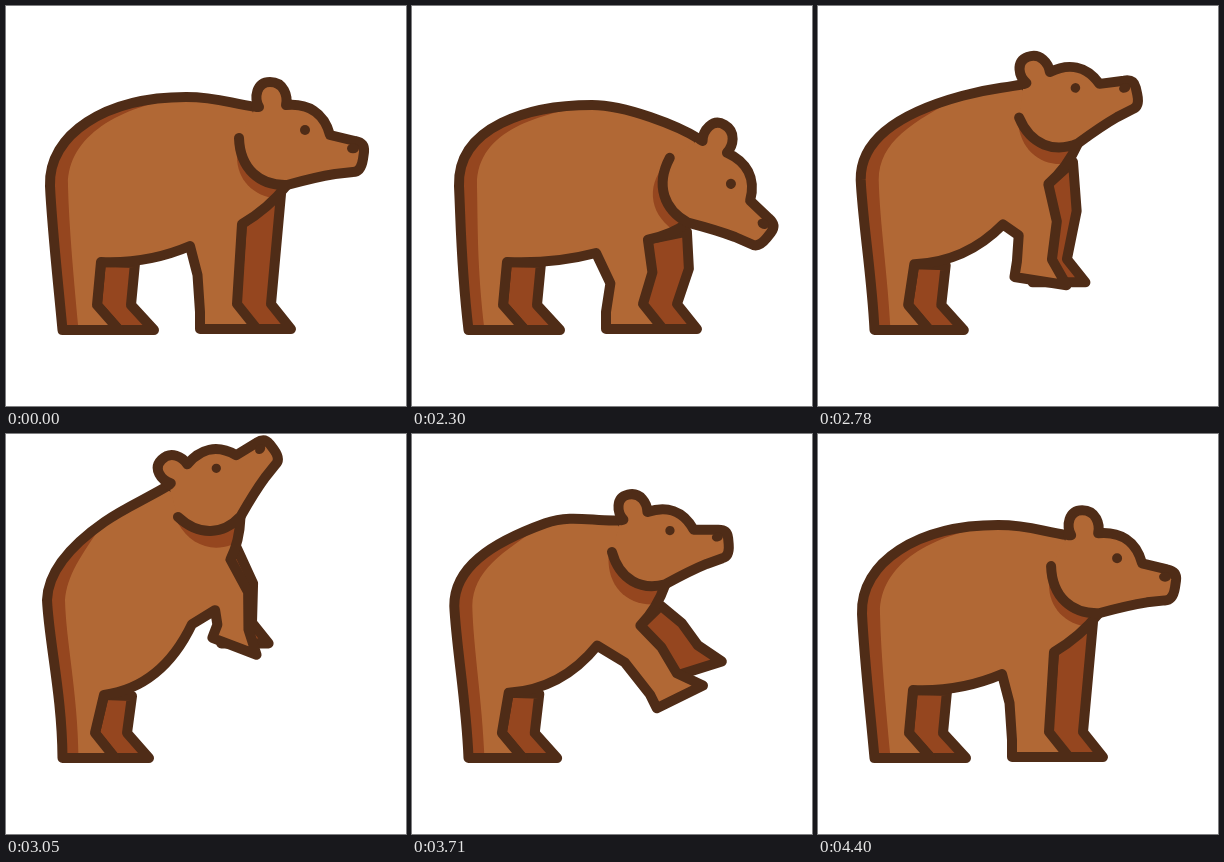
Write an HTML page with a canvas that moves like this. It is 400 px wide and 400 px high and loops after 4430 ms.

```html
<!DOCTYPE html>
<html lang="en">
<head>
<meta charset="utf-8">
<title>Bear</title>
<style>
  html, body { margin: 0; height: 100%; overflow: hidden; background: #fff; }
  canvas { display: block; width: 100vw; height: 100vh; }
</style>
</head>
<body>
<canvas id="stage" width="400" height="400"></canvas>
<script>
const ctx = document.getElementById('stage').getContext('2d');
const FUR = '#b16835', SHADE = '#95461f', LINE = '#4f2c17', WEIGHT = 10;
const LOOP = 4430, EYE = [299, 124];

// Drawn in rest coordinates and turned about the eye.
const HEAD = new Path2D('M250 101H253C248 92 250 76 264 76C278 76 282 90 280 99' +
  'C301 97 318 106 324 129L349 135Q359 137 358 146L357 153Q355 166 347 166L329 168' +
  'Q310 171 281 179C254 180 234 163 233 132');
const THROAT = new Path2D('M233 136C225 165 241 190 272 193L285 180L250 140Z');

// A pose: eye x, y, head angle, head size, rise of the torso, elbow bend,
// then wrist x, y and paw angle for the near and the far foreleg.
const planted = [231, 298, 0, 265, 298, 0];
const stand = [299, 124, 0, 1, 0, 0, ...planted];
const crouch = [319, 178, 30, 1, 0, 7, ...planted];
const push = [305, 141, 9.5, .98, 0, 5, 230, 298, 0, 254, 297, 0];
const rear = [210, 34, -45, .93, 1, 9, 243, 195, 21, 246, 187, 0];
const reach = [229, 57, -35, .89, .85, 4, 257, 204, -35, 272, 168, -35];
const fall = [242, 75, -25, .91, .72, 3, 270, 222, -32, 289, 188, -24];
const keys = [[2000, stand], [2310, crouch], [2540, push], [3070, rear],
  [3500, reach], [3640, fall], [3950, crouch], [4420, stand]];

// Monotone cubic interpolation: poses flow through the keys without overshoot.
function slope(k, i) {
  if (k === 0 || k === keys.length - 1) return 0;
  const rate = n => (keys[n + 1][1][i] - keys[n][1][i]) / (keys[n + 1][0] - keys[n][0]);
  const a = rate(k - 1), b = rate(k);
  return a * b > 0 ? 2 * a * b / (a + b) : 0;
}

function poseAt(time) {
  const k = keys.findIndex(([end]) => time < end) - 1;
  if (k < 0) return stand;
  const [start, from] = keys[k], [end, to] = keys[k + 1];
  const d = end - start, u = (time - start) / d, ease = u * u * (3 - 2 * u);
  return from.map((v, i) => v + (to[i] - v) * ease +
    d * u * (1 - u) * ((1 - u) * slope(k, i) - u * slope(k + 1, i)));
}

const add = ([x, y], dx, dy = 0) => [x + dx, y + dy];
const middle = (a, b) => [(a[0] + b[0]) / 2, (a[1] + b[1]) / 2];
const spin = (x, y, degrees) => {
  const a = degrees * Math.PI / 180, c = Math.cos(a), s = Math.sin(a);
  return [x * c - y * s, x * s + y * c];
};

function polygon(points) {
  const path = new Path2D();
  points.forEach(p => path.lineTo(...p));
  path.closePath();
  return path;
}

function paint(path, fill) {
  ctx.fillStyle = fill;
  ctx.fill(path);
  ctx.stroke(path);
}

function dot(x, y, rx, ry) {
  ctx.beginPath();
  ctx.ellipse(x, y, rx, ry, 0, 0, 7);
  ctx.fillStyle = LINE;
  ctx.fill();
}

// Front edge of a foreleg and its paw, from shoulder round to the back of the wrist
function foreleg(shoulder, wrist, paw, bend, scale) {
  const dx = wrist[0] - shoulder[0], dy = wrist[1] - shoulder[1], reach = Math.hypot(dx, dy);
  const elbow = add(middle(shoulder, wrist), bend * dy / reach, -bend * dx / reach);
  const onPaw = (x, y) => add(wrist, ...spin(x * scale, y * scale, paw));
  return { elbow, toe: onPaw(20, 25), heel: onPaw(-37, 25), ankle: onPaw(-37, 8) };
}

function draw([ex, ey, angle, size, rise, bend, nearX, nearY, nearPaw, farX, farY, farPaw]) {
  const sink = Math.max(0, angle) / 30;
  const onHead = (x, y) => add([ex, ey], ...spin((x - EYE[0]) * size, (y - EYE[1]) * size, angle));
  const inHead = (scale, action) => {
    ctx.save();
    ctx.translate(ex, ey);
    ctx.rotate(angle * Math.PI / 180);
    ctx.scale(scale, scale);
    ctx.translate(-EYE[0], -EYE[1]);
    ctx.lineWidth = WEIGHT / scale;
    action();
    ctx.restore();
  };

  // Back line, from the hind foot over hip and top to the nape
  const foot = [56.5, 324], nape = onHead(250, 101), jaw = onHead(281, 179);
  const hip = [44 - 3 * rise + 3 * sink, 180 - 14 * rise];
  const top = [180 - 82 * rise, 91 - 3 * rise + 8 * sink], tilt = -35 * rise;
  const heelBend = [52 + 4 * rise - 3 * sink, 275 - 15 * rise - 15 * sink];
  const thigh = add(hip, 2, 42);
  const rump = add(hip, -2 + 3 * rise, -52 + 25 * rise - 8 * sink);
  const loin = add(top, ...spin(-80 + 36 * rise + 18 * sink, 0, tilt));
  const withers = add(top, ...spin(33 - 8 * rise, 0, tilt));
  const neck = add(nape, ...spin(-26, 0, angle * .85 + 7));

  // Forelegs hang from the jaw; the hind legs only lean a little.
  const scale = 1 - .17 * rise;
  const nearWrist = [nearX, nearY], farWrist = [farX, farY];
  const shoulder = add(jaw, -45 + 35 * rise + 5 * sink, 39 + 4 * rise - 22 * sink);
  const farShoulder = add(jaw, -6 + 2 * rise + 5 * sink, 9 + 22 * rise);
  const near = foreleg(shoulder, nearWrist, nearPaw, bend, scale);
  const far = foreleg(farShoulder, farWrist, farPaw, bend, scale);
  const armpit = [184 + 2 * rise, 240 - 50 * rise + 7 * sink];
  const groin = [95 + 3 * rise, 256 + 5 * rise];
  const knee = [91 - 2 * rise, 299], toe = [113 - 4 * rise, 324];

  ctx.clearRect(0, 0, 400, 400);
  ctx.strokeStyle = LINE;
  ctx.lineWidth = WEIGHT;
  ctx.lineJoin = ctx.lineCap = 'round';

  paint(polygon([groin, add(groin, 34 - 6 * rise, 1), add(knee, 34 - 2 * rise),
    add(toe, 35 - rise), toe, knee]), SHADE);
  paint(polygon([farShoulder, far.elbow, farWrist, far.toe, far.heel, shoulder]), SHADE);

  const back = path => {
    path.moveTo(...foot);
    path.bezierCurveTo(...heelBend, ...thigh, ...hip);
    path.bezierCurveTo(...rump, ...loin, ...top);
    return path;
  };
  const body = back(new Path2D());
  body.bezierCurveTo(...withers, ...neck, ...nape);
  body.lineTo(...jaw);
  body.quadraticCurveTo(...add(middle(jaw, shoulder), 4, 4), ...shoulder);
  [near.elbow, nearWrist, near.toe, near.heel, near.ankle,
    add(near.elbow, -42 + 9 * rise, 11 + 7 * rise), armpit].forEach(p => body.lineTo(...p));
  body.quadraticCurveTo(142 + 14 * rise, 258 - 5 * rise, ...groin);
  body.lineTo(...knee);
  body.lineTo(...toe);
  body.closePath();
  ctx.fillStyle = FUR;
  ctx.fill(body);

  // Shadows along the back and under the jaw
  const strip = back(new Path2D());
  strip.bezierCurveTo(...add(loin, 12, 9), ...add(rump, 19, 3), ...add(hip, 18));
  strip.bezierCurveTo(...add(thigh, 17), ...add(heelBend, 16), ...add(foot, 16));
  ctx.save();
  ctx.clip(body);
  ctx.fillStyle = SHADE;
  ctx.fill(strip);
  inHead(1, () => ctx.fill(THROAT));
  ctx.restore();
  ctx.stroke(body);

  inHead(size, () => {
    paint(HEAD, FUR);
    dot(...EYE, 5, 5);
    dot(347, 142.5, 6, 4.8);
  });
}

function frame() {
  draw(poseAt(performance.now() % LOOP));
  requestAnimationFrame(frame);
}
frame();
</script>
</body>
</html>
```
